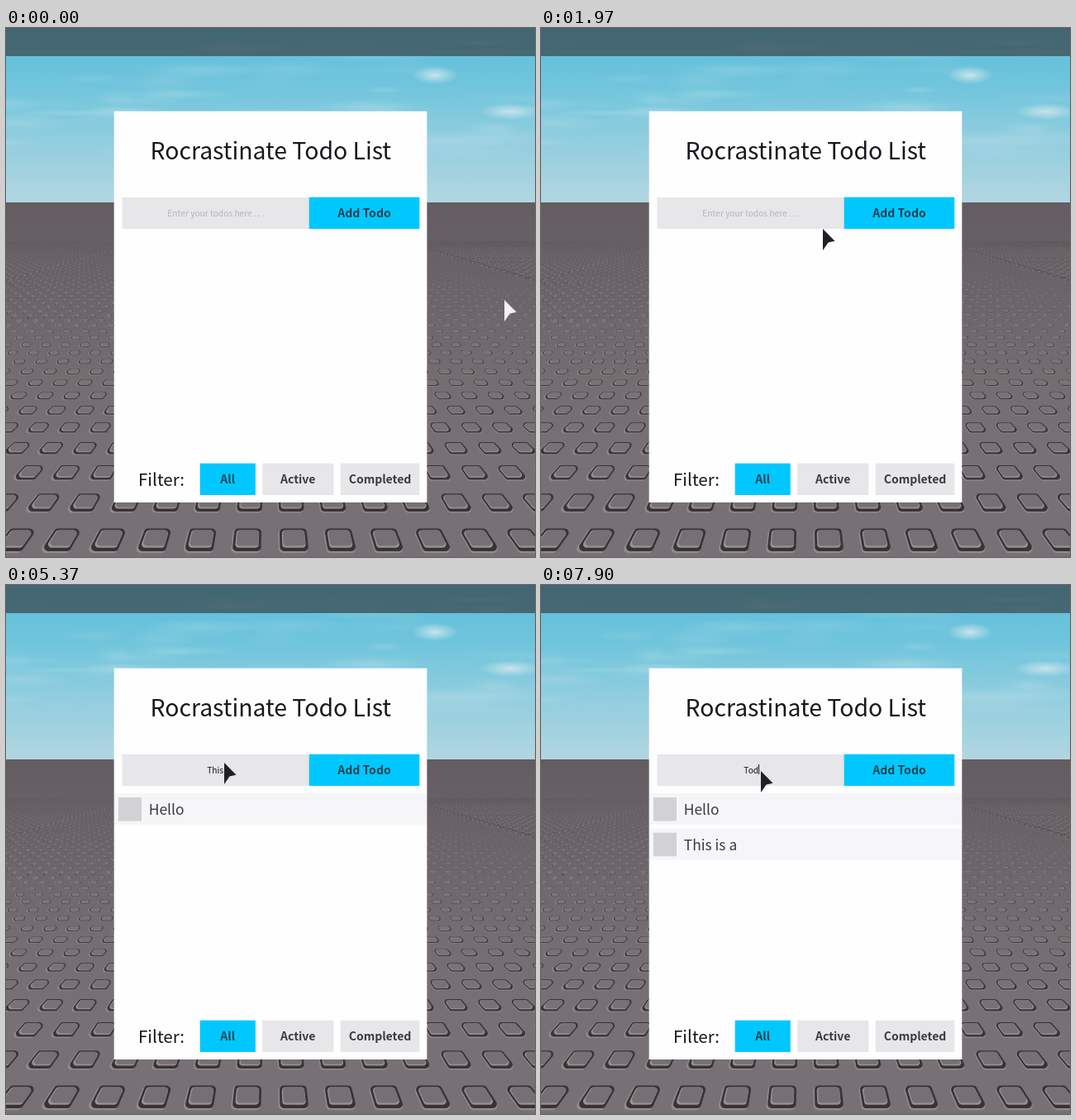
An HTML page with a canvas for the animation above (8 s loop, 640 by 640 pixels).

```html
<!DOCTYPE html>
<html lang="en">
<head>
<meta charset="utf-8">
<title>Todo list</title>
<style>
  html, body { margin: 0; width: 100%; height: 100%; overflow: hidden; background: #676064; }
  canvas { display: block; width: 640px; height: 640px; }
</style>
</head>
<body>
<canvas id="stage" width="640" height="640"></canvas>
<script>
const LOOP = 8000, SIZE = 640, HORIZON = 211;
const FONT = '"Noto Sans CJK JP", "Noto Sans CJK SC", "Noto Sans", sans-serif';
const BLUE = '#00c8ff', GREY = '#e7e6e9', INK = '#3c3a3f', BLACK = '#19171b';
const ctx = document.getElementById('stage').getContext('2d');

function rect(c, x, y, w, h, fill) {
  c.fillStyle = fill;
  c.fillRect(x, y, w, h);
}

function text(c, str, x, y, size, color, align = 'left', weight = 400) {
  c.font = `${weight} ${size}px ${FONT}`;
  c.textAlign = align;
  c.fillStyle = color;
  c.fillText(str, x, y);
}

function gradient(c, y0, y1, ...colors) {
  const g = c.createLinearGradient(0, y0, 0, y1);
  colors.forEach((col, i) => g.addColorStop(i / (colors.length - 1), col));
  return g;
}

let seed = 7;
function random(min, max) {
  seed = (seed * 16807) % 2147483647;
  return min + (max - min) * seed / 2147483647;
}

function cloud(c, x, y, rx, ry, alpha) {
  c.save();
  c.translate(x, y);
  c.scale(rx, ry);
  const g = c.createRadialGradient(0, 0, 0, 0, 0, 1);
  g.addColorStop(0, `rgba(222,236,240,${alpha})`);
  g.addColorStop(1, 'rgba(222,236,240,0)');
  rect(c, -1, -1, 2, 2, g);
  c.restore();
}

function drawSky(c) {
  rect(c, 0, 0, SIZE, HORIZON, gradient(c, 0, HORIZON, '#5cbdd9', '#70c5dc', '#93cedf', '#b2d6e0'));
  for (let i = 0; i < 45; i++) {
    cloud(c, random(0, SIZE), random(0, 150), random(25, 90), random(4, 13), random(0.06, 0.2));
  }
  cloud(c, 519, 57, 28, 11, 0.8);
  cloud(c, 611, 101, 38, 10, 0.75);
  rect(c, 0, 0, SIZE, 34, 'rgba(53,57,61,0.65)');
}

// Baseplate point: u in studs across, v in studs away from the eye.
function ground(u, v) {
  const d = 3279 / v;
  return [320 + u * d * 0.1373, HORIZON + d];
}

function slab(c, u, v, ru, rv, round, fill) {
  const a = [[-1, 1], [1, 1], [1, -1], [-1, -1]].map(([i, j]) => ground(u + i * ru, v + j * rv));
  c.beginPath();
  c.moveTo((a[0][0] + a[3][0]) / 2, (a[0][1] + a[3][1]) / 2);
  for (let i = 0; i < 4; i++) c.arcTo(...a[i], ...a[(i + 1) % 4], round);
  c.fillStyle = fill;
  c.fill();
}

function drawStud(c, u, v, scale) {
  slab(c, u - 0.02, v - 0.03, 0.31, 0.28, 5 * scale, '#918a8d');
  slab(c, u, v, 0.3, 0.27, 5 * scale, '#383337');
  slab(c, u, v + 0.02, 0.25, 0.21, 4 * scale, '#9a9396');
  slab(c, u + 0.01, v + 0.04, 0.235, 0.19, 4 * scale, '#767074');
}

function drawGround(c) {
  rect(c, 0, HORIZON, SIZE, SIZE - HORIZON,
    gradient(c, HORIZON, SIZE, '#635c61', '#6b6468', '#746d71', '#777074', '#777074'));
  for (let k = 62; k >= 0; k--) {
    const v = 8.04 + k, scale = 8.04 / v;
    const count = Math.ceil(320 / (56 * scale)) + 1;
    c.globalAlpha = Math.max(0, 1 - k / 63);
    for (let i = -count; i < count; i++) drawStud(c, i + 0.5, v, scale);
  }
  c.globalAlpha = 1;
}

function button(c, label, x, y, w, fill) {
  rect(c, x - 0.3, y - 0.3, w + 0.6, 38.3, fill);
  text(c, label, x + w / 2, y + 23.5, 14, fill === BLUE ? '#1d4250' : INK, 'center', 700);
}

function drawPanel(c) {
  rect(c, 130.7, 100.7, 378.6, 473.3, '#fffeff');
  text(c, 'Rocrastinate Todo List', 320.3, 158.5, 28.35, BLACK, 'center');
  rect(c, 140.5, 205, 227, 38, GREY);
  button(c, 'Add Todo', 367, 205, 133, BLUE);
  text(c, 'Filter:', 160, 553.5, 20.6, BLACK);
  button(c, 'All', 235, 527, 66.5, BLUE);
  button(c, 'Active', 310.5, 527, 85.5, GREY);
  button(c, 'Completed', 405, 527, 95, GREY);
}

const scene = document.createElement('canvas');
scene.width = scene.height = SIZE;
const back = scene.getContext('2d');
drawSky(back);
drawGround(back);
drawPanel(back);

// The field has focus during from..to; keys are struck evenly during first..last.
const entries = [
  { str: 'Hello', from: 1030, first: 2300, last: 2970, to: 3700 },
  { str: 'This is a', from: 4120, first: 4700, last: 5830, to: 6480 },
  { str: 'Tod', from: 6780, first: 7400, last: 7890, to: LOOP }
];
const ADD_DELAY = 130, BLINK = 312;

// Pointer moves, each continuing from the one before.
const home = [603, 329];
const moves = [
  { from: 30, to: 700, end: [395, 224] },
  { from: 890, to: 1000, end: [360, 218] },
  { from: 1010, to: 1830, end: [341, 243] },
  { from: 3400, to: 3680, end: [411, 214] },
  { from: 3800, to: 4130, end: [264, 215] },
  { from: 5970, to: 6450, end: [429, 218] },
  { from: 6590, to: 6800, end: [266, 225] }
];

function pointerAt(t) {
  return moves.reduce((pos, m) => {
    const k = Math.min(1, Math.max(0, (t - m.from) / (m.to - m.from)));
    const ease = k * k * (3 - 2 * k);
    return pos.map((p, i) => p + (m.end[i] - p) * ease);
  }, home);
}

function typedAt(e, t) {
  if (t < e.first) return '';
  const gap = (e.last - e.first) / (e.str.length - 1);
  return e.str.slice(0, Math.floor((t - e.first) / gap) + 1);
}

function drawInput(t) {
  const entry = entries.find(e => t >= e.from && t < e.to);
  const typed = entry ? typedAt(entry, t) : '';
  const shown = typed || 'Enter your todos here . . .';
  text(ctx, shown, 254.2, 228, 10.2, typed ? BLACK : '#b6b5b8', 'center');
  if (entry && Math.floor((t - entries[0].from) / BLINK) % 2 === 0) {
    const caret = typed ? 254.2 + ctx.measureText(shown).width / 2 : 195;
    rect(ctx, caret, 217, 1, 12, BLACK);
  }
}

function drawTodos(t) {
  entries.filter(e => t >= e.to + ADD_DELAY).forEach((e, i) => {
    const y = 252 + i * 42.7;
    rect(ctx, 131, y, 378, 38, '#f6f5f8');
    rect(ctx, 136, y + 5, 28, 28.5, '#d2d1d4');
    text(ctx, e.str, 172.8, y + 26, 17.4, INK);
  });
}

function drawPointer(t) {
  const [x, y] = pointerAt(t);
  ctx.beginPath();
  [[0, 0], [14.5, 14.8], [6.5, 16.5], [0, 26]].forEach(([dx, dy]) => ctx.lineTo(x + dx, y + dy));
  ctx.fillStyle = x < 509 ? '#231f25' : '#f4f2f4';
  ctx.fill();
}

const start = performance.now();
function frame() {
  const t = (performance.now() - start) % LOOP;
  ctx.drawImage(scene, 0, 0);
  drawInput(t);
  drawTodos(t);
  drawPointer(t);
  requestAnimationFrame(frame);
}
frame();
</script>
</body>
</html>
```
